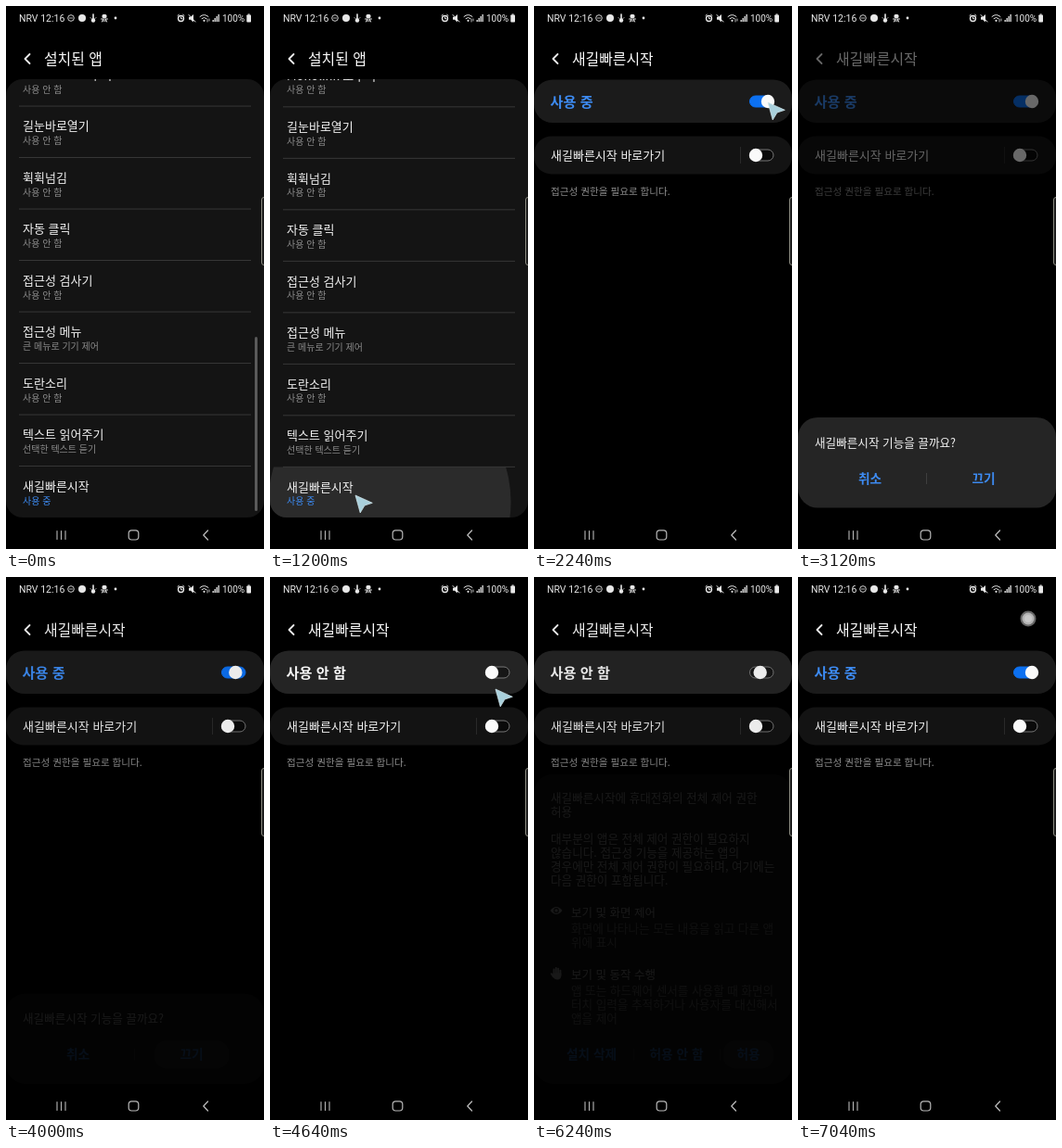
Recreate the animation shown at these times as an HTML page. Size 278 px wide and 586 px high, loop 7120 ms.

```html
<!DOCTYPE html>
<html lang="ko">
<head>
<meta charset="utf-8">
<style>
html, body { margin: 0; width: 100%; height: 100%; overflow: hidden; background: #000; }
svg { display: block; width: 278px; height: 586px; }
text { font-family: "Noto Sans CJK KR", "Noto Sans CJK", "Noto Sans", sans-serif; white-space: pre; }
.bar text { font-family: Roboto, "Noto Sans", sans-serif; }
</style>
</head>
<body>
<svg id="stage" viewBox="0 0 278 586"></svg>
<script>
const LOOP = 7120, BLUE = '#3d8bf2', APP = '새길빠른시작';
const stage = document.getElementById('stage');

// Text is placed by its vertical centre.
const text = (x, y, size, str, fill = '#f2f2f2', weight = 400, anchor = 'start', id = '') =>
  `<text id="${id}" x="${x}" y="${y + size * .37}" font-size="${size}" fill="${fill}" font-weight="${weight}" text-anchor="${anchor}">${str}</text>`;
const box = (x, y, w, h, r, fill, extra = '') =>
  `<rect x="${x}" y="${y}" width="${w}" height="${h}" rx="${r}" fill="${fill}" ${extra}/>`;
const dot = (x, y, r, fill, extra = '') => `<circle cx="${x}" cy="${y}" r="${r}" fill="${fill}" ${extra}/>`;
const line = (d, color, w = 1) =>
  `<path d="${d}" fill="none" stroke="${color}" stroke-width="${w}" stroke-linecap="round" stroke-linejoin="round"/>`;
const shape = (d, fill) => `<path d="${d}" fill="${fill}"/>`;

const header = title => line('M25.5 52L20.5 57L25.5 62', '#f5f5f5', 1.8) + text(41, 57, 15.9, title, '#fafafa', 500);

const OFF = '사용 안 함';
const rows = [
  ['Monolink 도우미', OFF], ['길눈바로열기', OFF], ['휙휙넘김', OFF], ['자동 클릭', OFF],
  ['접근성 검사기', OFF], ['접근성 메뉴', '큰 메뉴로 기기 제어'], ['도란소리', OFF],
  ['텍스트 읽어주기', '선택한 텍스트 듣기'], [APP, '사용 중']
].map(([name, note], i) => {
  const y = 73.9 + 55.5 * i;
  return text(18, y, 13, name) + text(18, y + 16, 10, note, i == 8 ? BLUE : '#8c8c8c') +
    (i < 8 ? box(14, y + 33.7, 250, .9, 0, '#3a3a3a') : '');
}).join('');

const listPage = `${header('설치된 앱')}
  <g clip-path="url(#panel)">${box(0, 79, 278, 473, 0, '#141414')}
    ${dot(0, 0, 0, '#2b2b2b', 'id="ripple" clip-path="url(#lastRow)"')}
    <g id="rows">${rows}</g>
    ${box(268, 357, 3, 188, 1.5, '#5a5a5a', 'id="thumb"')}</g>`;

const detailPage = box(0, 26, 278, 526, 0, '#000') + header(APP) +
  box(0, 79.5, 278, 46.5, 20, '#1b1b1b', 'id="card"') +
  text(17.5, 103, 15.2, '', BLUE, 700, 'start', 'state') +
  box(232.5, 97, 25.5, 12, 6, '#000', 'id="track" stroke-width="1"') +
  dot(252, 103, 7.2, '#fafafa', 'id="knob"') +
  box(0, 140.5, 278, 41, 19, '#131313') + text(18, 161, 13, APP + ' 바로가기') +
  box(222, 152, 1, 18, 0, '#292929') +
  box(232.5, 155, 25.5, 12, 6, '#0a0a0a', 'stroke="#777"') + dot(239, 161, 7.2, '#fafafa') +
  text(18, 200.5, 10.6, '접근성 권한을 필요로 합니다.', '#8c8c8c');

const button = (x, str) => text(x, 510, 13.7, str, BLUE, 700, 'middle');
const split = x => box(x, 504, 1, 12, 0, '#3f3f3f');
const press = (id, x, w) => box(x, 495, w, 30, 13, '#fff', `id="${id}" opacity="0"`);
const lines = (x, y, step, size, list, fill, weight) =>
  list.map((s, i) => text(x, y + step * i, size, s, fill, weight)).join('');

const offDialog = box(0, 444, 278, 97.5, 21, '#252525') + text(18, 471, 12.6, APP + ' 기능을 끌까요?') +
  press('pressOff', 160, 80) + button(77.5, '취소') + split(138) + button(200, '끄기');

const eye = shape('M17.5 354.5Q24 346.5 30.5 354.5Q24 362.5 17.5 354.5Z', '#f5f5f5') +
  dot(24, 354.5, 2.9, '#252525') + dot(24, 354.5, 1.7, '#f5f5f5');
const hand = line('M21.5 424V418M23.8 423V416.5M26.1 423V417.2M28.4 424V419.2M21 426L18.8 422.8', '#f5f5f5', 1.9) +
  shape('M20.5 422H29.3V425Q29 429 25 429Q22.5 429 20 426Z', '#f5f5f5');

const allowDialog = box(0, 207, 278, 334.5, 21, '#252525') +
  lines(18, 233, 15, 12.6, [APP + '에 휴대전화의 전체 제어 권한', '허용'], '#f2f2f2', 500) +
  lines(18, 277, 15, 12.6, ['대부분의 앱은 전체 제어 권한이 필요하지', '않습니다. 접근성 기능을 제공하는 앱의',
    '경우에만 전체 제어 권한이 필요하며, 여기에는', '다음 권한이 포함됩니다.']) +
  eye + text(40, 356.5, 12.5, '보기 및 화면 제어', '#f2f2f2', 500) +
  lines(40, 374, 15, 12.6, ['화면에 나타나는 모든 내용을 읽고 다른 앱', '위에 표시'], '#999') +
  hand + text(40, 424, 12.5, '보기 및 동작 수행', '#f2f2f2', 500) +
  lines(40, 441, 15, 12.6, ['앱 또는 하드웨어 센서를 사용할 때 화면의', '터치 입력을 추적하거나 사용자를 대신해서', '앱을 제어'], '#999') +
  press('pressAllow', 204, 54) + button(62, '설치 삭제') + split(107) + button(153.5, '허용 안 함') +
  split(200) + button(231, '허용');

const W = '#e8e8e8';
const statusBar = text(14, 13, 10.5, 'NRV 12:16', W) +
  dot(70, 13, 3.3, 'none', `stroke="${W}" stroke-width=".9"`) + line('M68.5 13H71.5', W, .8) +
  dot(82, 13, 4, W) +
  line('M94 9V14', W, 1.6) + dot(94, 15.5, 2.2, W) + line('M91 12.5L92 13.5M97 12.5L96 13.5', W, .8) +
  box(103.5, 9, 5, 4, 1.5, W) + line('M102.5 14H109.5M103.5 17L104.5 14.5M108.5 17L107.5 14.5M104.5 16H107.5', W, 1) +
  dot(118, 13, 1.4, W) +
  dot(188.5, 13.5, 3, 'none', `stroke="${W}" stroke-width="1.3"`) + line('M185 10.3L186.3 9.3M192 10.3L190.7 9.3M188.5 12V13.7H190', W) +
  shape('M197 11.7H199L202 9V17.5L199 14.8H197Z', W) + line('M197 9.5L204 17', W, 1) +
  line('M209 11.5Q213.5 7.5 218 11.5M211 13.5Q213.5 11.3 216 13.5', W, 1) + dot(213.5, 15.8, 1.1, W) + line('M217 14V17M219 16V14', W, .8) +
  [0, 1, 2, 3].map(i => box(222.5 + 2 * i, 15 - 2 * i, 1.3, 2 + 2 * i, 0, W)).join('') +
  text(233, 13, 10, '100%', W) + box(259.3, 9.5, 4.7, 8, .8, W) + box(260.6, 8.5, 2, 1.2, 0, W);

const N = '#b8b8b8';
const navBar = line('M55 566.5V575.5M59.5 566.5V575.5M64 566.5V575.5', N, 1.1) +
  box(132.2, 565.8, 10.6, 10.2, 3.2, 'none', `stroke="${N}" stroke-width="1.2"`) +
  line('M217.5 566L212.8 571L217.5 576', N, 1.3);

stage.innerHTML = `<defs>
    <clipPath id="panel">${box(0, 79, 278, 473, 18, '#fff')}</clipPath>
    <clipPath id="lastRow">${box(0, 497.5, 278, 55, 0, '#fff')}</clipPath>
  </defs>
  ${box(0, 0, 278, 586, 0, '#000')}
  <g id="list">${listPage}</g><g id="detail">${detailPage}</g>
  ${box(0, 26, 278, 526, 0, '#000', 'id="scrim"')}
  <g id="off">${offDialog}</g><g id="allow">${allowDialog}</g>
  <g class="bar">${statusBar}</g>${navBar}
  ${box(275.5, 206.5, 6, 73, 2.5, '#1a1a1a', 'stroke="#8a8a80"')}
  <g id="touch">${dot(248, 45, 8.5, '#666')}${dot(248, 45, 6.5, '#b4b4b4')}${dot(248, 45, 4, '#c8c8c8')}</g>
  <path id="cursor" d="M0 0L18.3 8.3L10 11L5.2 19Z" fill="#a9d0dc" stroke="#d6e8ee" stroke-width=".7" stroke-linejoin="round"/>`;

const el = {};
stage.querySelectorAll('[id]').forEach(e => { if (e.id) el[e.id] = e; });
const set = (id, attrs) => { for (const k in attrs) el[id].setAttribute(k, attrs[k]); };
const ramp = (t, a, b) => {
  const u = Math.min(1, Math.max(0, (t - a) / (b - a)));
  return u * u * (3 - 2 * u);
};
const within = (t, a, b) => t >= a && t < b;

// [from, to, x, y] of each pointer visit
const visits = [[1040, 1440, 92, 528], [2160, 2800, 252, 104], [3360, 3840, 204, 497], [4640, 5200, 243, 121], [5600, 6080, 225, 496]];

function draw(t) {
  set('rows', { transform: `translate(0 ${.8 * ramp(t, 80, 400)})` });
  set('thumb', { opacity: 1 - ramp(t, 80, 700) });
  const grow = Math.max(0, (t - 1040) / 160), drift = Math.min(1, grow);
  set('ripple', { cx: 95 + 34 * drift, cy: 535, r: within(t, 1040, 1600) ? 40 + 90 * grow : 0 });

  const page = ramp(t, 1360, 1560), zoom = .94 + .06 * page;
  set('detail', { opacity: page, transform: `translate(139 293) scale(${zoom}) translate(-139 -293)` });

  const on = 1 - ramp(t, 3920, 4120) + ramp(t, 6160, 6360), isOn = on > .5;
  set('card', { fill: isOn ? '#1b1b1b' : '#242424' });
  set('state', { fill: isOn ? BLUE : '#f5f5f5' });
  el.state.textContent = isOn ? '사용 중' : OFF;
  set('track', { fill: isOn ? '#0c70f0' : '#161616', stroke: isOn ? '#0c70f0' : '#777' });
  set('knob', { cx: 239 + 13 * on });

  const off = ramp(t, 2840, 3040) - ramp(t, 3840, 4040);
  const allow = ramp(t, 5200, 5400) - ramp(t, 6080, 6280);
  set('scrim', { opacity: .58 * Math.max(off, allow) });
  set('off', { opacity: off, transform: `translate(0 ${6 * (1 - off)})` });
  set('allow', { opacity: allow, transform: `translate(0 ${6 * (1 - allow)})` });
  set('pressOff', { opacity: .1 * ramp(t, 3440, 3600) });
  set('pressAllow', { opacity: .1 * ramp(t, 5680, 5840) });

  const v = visits.find(([a, b]) => within(t, a, b));
  set('cursor', v ? { opacity: 1, transform: `translate(${v[2]} ${v[3]})` } : { opacity: 0 });
  set('touch', { opacity: t >= 6960 ? 1 : 0 });
}

function tick() {
  draw(performance.now() % LOOP);
  requestAnimationFrame(tick);
}
tick();
</script>
</body>
</html>
```
